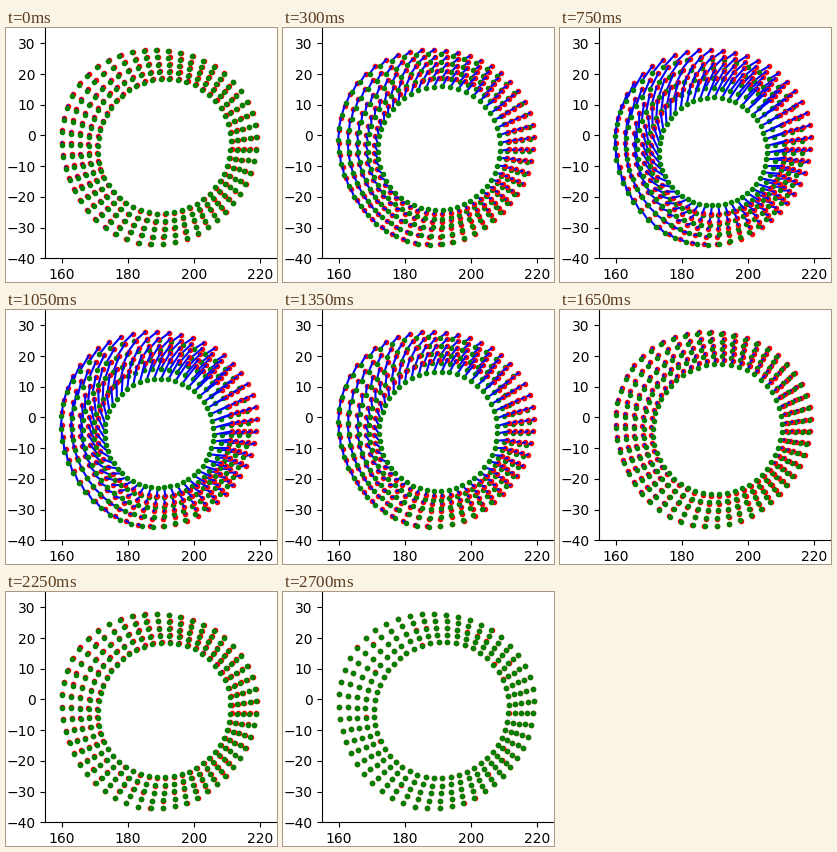
These frames come from a looping animation (271 by 254 pixels, 2850 ms). A matplotlib script:

```python
import numpy as np
import matplotlib.pyplot as plt
from matplotlib.animation import FuncAnimation

W, H, DPI = 271, 254, 100
LEFT, BASE = 39.2, 230.2          # axes corner in stage pixels
FRAMES, INTERVAL = 19, 150
SPOKES, RINGS = 50, 5

theta = np.radians(2) + 2 * np.pi * np.arange(SPOKES) / SPOKES
depth = np.linspace(1, 0, RINGS)[:, None]      # 1 outer wall, 0 inner wall


def wave(order, amplitude, phase):
    return amplitude * np.cos(order * theta + np.radians(phase))


inner_c = np.array([157, 118.5])
inner_r = 67.8 + wave(1, 1.5, 50) + wave(2, 1.5, 110)
outer_c = np.array([153.5, 117.5])
outer_r = 97.3 + wave(1, 2, 150) + wave(3, 2.3, 60)


def polar(center, r, angle):
    return center[:, None] + r * np.array([np.cos(angle), np.sin(angle)])


def blend(inner, outer):
    """Points indexed as (xy, ring, spoke), outermost ring first."""
    return inner[:, None] * (1 - depth) + outer[:, None] * depth


def to_data(p):
    return np.array([155 + (p[0] + 0.5 - LEFT) * 70 / (W - LEFT),
                     35 - (p[1] + 0.5) * 75 / BASE])


def ease(u):
    u = np.clip(u, 0, 1)
    return u * u * (3 - 2 * u)


def beat(i):
    """Quick contraction, short hold, release and a slow tail."""
    rise = ease((i + 1) / 6.5)
    release = ease((i - 6) / 6)
    tail = max(0.02 * (18.5 - i), 0)
    return rise * (1 - release * (1 - tail))


def deformed(i):
    squeeze = beat(i)
    turn = theta - beat(i + 0.5) * (0.075 - 0.065 * np.cos(theta))
    shift = squeeze * np.array([-4.7, 4.5])
    inner = polar(inner_c + shift,
                  inner_r + squeeze * (53.7 - inner_r), turn)
    outer = polar(outer_c + shift, outer_r - 4.3 * squeeze, turn)
    return blend(inner, outer)


fig = plt.figure(figsize=(W / DPI, H / DPI), dpi=DPI)
ax = fig.add_axes([LEFT / W, 1 - BASE / H, 1 - LEFT / W, BASE / H])
ax.set(xlim=(155, 225), ylim=(-40, 35),
       xticks=range(160, 221, 20), yticks=range(-40, 31, 10))
ax.spines[["top", "right"]].set_visible(False)

start = to_data(blend(polar(inner_c, inner_r, theta),
                      polar(outer_c, outer_r, theta)))
links, ends = [], []
for ring in range(RINGS):
    ax.plot(*start[:, ring], "r.")
    links += ax.plot([], [], "b-", lw=1.5)
    ends += ax.plot([], [], "g.")


def update(i):
    end = to_data(deformed(i))
    gap = np.full_like(start, np.nan)
    segments = np.stack([start, end, gap], axis=-1)
    for ring in range(RINGS):
        links[ring].set_data(*segments[:, ring].reshape(2, -1))
        ends[ring].set_data(*end[:, ring])
    return links + ends


anim = FuncAnimation(fig, update, frames=FRAMES, interval=INTERVAL,
                     repeat=True, repeat_delay=0)
plt.show()
```
